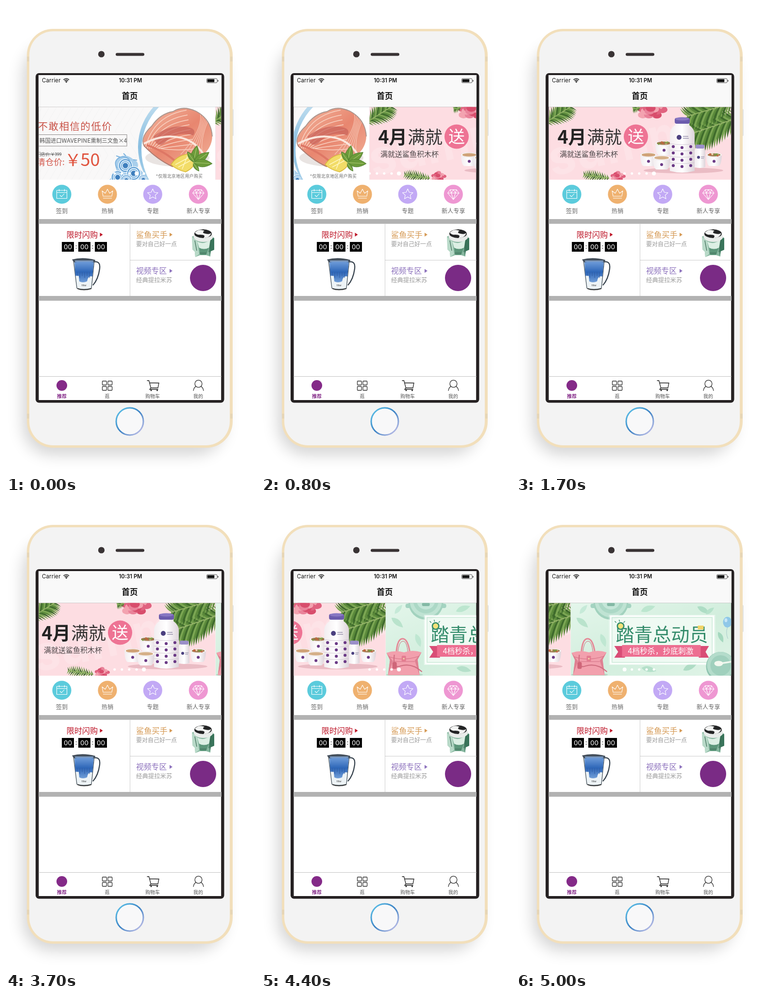
Recreate the animation shown at these times as an HTML page. Size 513 px wide and 962 px high, loop 7.1 s.

```html
<!DOCTYPE html>
<html lang="zh-CN">
<head>
<meta charset="utf-8">
<title>首页</title>
<style>
html, body { margin: 0; width: 100%; height: 100%; overflow: hidden; background: #fff; }
#stage { display: block; width: 513px; height: 962px; font-family: "Noto Sans CJK SC", "Noto Sans CJK", sans-serif; }
.ui { font-family: Inter, Roboto, sans-serif; }
</style>
</head>
<body>
<svg id="stage" viewBox="0 0 513 962"></svg>
<script>
const PAGE = 376;
const WHITE = 'fill="#fff"';

let seed = 7;
const rand = () => (seed = (seed * 16807) % 2147483647) / 2147483647;
const range = (n, fn) => Array.from({ length: n }, (_, i) => fn(i)).join('');

const text = (x, y, size, fill, str, more = '') =>
  `<text x="${x}" y="${y}" font-size="${size}" fill="${fill}" ${more}>${str}</text>`;
const mid = 'text-anchor="middle"';
const rect = (x, y, w, h, fill, r = 0, more = '') =>
  `<rect x="${x}" y="${y}" width="${w}" height="${h}" rx="${r}" fill="${fill}" ${more}/>`;
const disc = (x, y, r, fill, more = '') =>
  `<circle cx="${x}" cy="${y}" r="${r}" fill="${fill}" ${more}/>`;
const oval = (x, y, rx, ry, fill, more = '') =>
  `<ellipse cx="${x}" cy="${y}" rx="${rx}" ry="${ry}" fill="${fill}" ${more}/>`;
const path = (d, fill, more = '') => `<path d="${d}" fill="${fill}" ${more}/>`;
const line = (d, stroke, w = 1, more = '') =>
  `<path d="${d}" fill="none" stroke="${stroke}" stroke-width="${w}" ${more}/>`;
const slide = (i, left, body) =>
  `<svg x="${67.5 + i * PAGE}" y="207.5" width="${PAGE}" height="150" viewBox="${left} 207.5 ${PAGE} 150">${body}</svg>`;

// Palm frond growing along +x before rotation
function palm(x, y, angle, len, width, n) {
  const blades = range(n, i => {
    const s = len * i / n, w = width * (0.45 + 0.55 * Math.sin(Math.PI * (i + 1) / (n + 1)));
    return [1, -1].map(k => path(
      `M${s} 0Q${s + w * 0.3} ${k * w * 0.25} ${s + w * 0.75} ${k * w}Q${s + w * 0.6} ${k * w * 0.25} ${s + 4} 0Z`,
      ['#3f6b2c', '#5b8a3b', '#7ba653'][(i + (k > 0)) % 3])).join('');
  });
  return `<g transform="translate(${x} ${y}) rotate(${angle})">${blades}${line(`M0 0H${len}`, '#9dbb6b', 1.5)}</g>`;
}

const flower = (x, y, r) => range(16, i => {
  const a = i * 2.4, d = r * (1 - i / 18);
  return oval(x + d * Math.cos(a), y + d * 0.7 * Math.sin(a), r * 0.42, r * 0.3,
    ['#e0627f', '#f3a3b0', '#e9839a', '#d84d6c'][i % 4]);
});

const cup = (x, y, rx, h, food) =>
  path(`M${x - rx} ${y}Q${x - rx + 1} ${y + h} ${x - rx * 0.55} ${y + h}H${x + rx * 0.55}Q${x + rx - 1} ${y + h} ${x + rx} ${y}Z`, 'url(#china)') +
  oval(x, y, rx, rx * 0.28, '#fff', 'stroke="#e3dadc" stroke-width=".7"') +
  oval(x, y, rx * 0.84, rx * 0.2, food) + disc(x, y + h * 0.58, 3, '#6b3a86');

function fishSlide() {
  const steak = 'M284 287Q276 269 300 247Q318 221 344 217Q364 204 391 216Q423 233 425 268Q424 291 406 306Q385 300 377 308Q360 322 343 330Q312 316 284 287Z';
  const scale = (x, y, r) => [1, 0.72, 0.45].map((k, i) =>
    disc(x, y, r * k, ['#5b9bd2', '#86b9e3', '#3f7fbd'][i], 'stroke="#e8f4fc" stroke-width="1.6"')).join('');
  const leaf = (x, y, a, l) => `<g transform="translate(${x} ${y}) rotate(${a})">` +
    path(`M0 0Q${l * 0.35} ${-l * 0.42} ${l} 0Q${l * 0.4} ${l * 0.42} 0 0Z`, '#6c9b3a', 'stroke="#47762a" stroke-width=".8"') +
    line(`M0 0H${l * 0.85}`, '#b7d27c', 0.9) + '</g>';
  return rect(55, 207, PAGE, 151, '#f9f8f8') +
    range(16, i => line(`M${60 + i * 15} 207l-30 50l30 50l-30 50`, '#f2f1f1', 0.8)) +
    path('M212 358Q222 346 231 345Q220 324 230 313Q246 301 262 315Q275 320 271 332L300 358Z', '#a9cfec') +
    scale(246, 328, 14) + scale(230, 352, 13) + scale(263, 344, 14) + scale(248, 358, 11) + scale(283, 357, 10) +
    line('M229 334Q220 318 235 311Q250 307 256 320M236 311l-9 -3M247 308l-5 -5M262 316l8 1', '#7fb4de', 2.2) +
    disc(395, 290, 123, 'url(#sea)') + disc(405, 296, 126, '#fff') +
    text(65.5, 255, 20.5, '#c95348', '不敢相信的低价', 'font-weight="500" letter-spacing="1.45"') +
    rect(50, 264.5, 199, 23.5, 'none', 0, 'stroke="#8d8a8a"') +
    text(69, 280.5, 11.4, '#555', '韩国进口<tspan font-size="12.3">WAVEPINE</tspan>熏制三文鱼×4') +
    text(63.5, 308, 8.6, '#555', '门店价:￥399', 'text-decoration="line-through"') +
    text(63.5, 327, 17.5, '#d2564a', '清仓价:') +
    text(121, 328.5, 34, '#e0543f', '￥', 'textLength="0"'.slice(99) + 'font-size="30"') +
    text(153.5, 329, 36, '#e0543f', '50') +
    oval(353, 312, 66, 18, '#e9e4e2') +
    `<clipPath id="cut">${path(steak, '#000')}</clipPath>` +
    path(steak, 'url(#salmon)') +
    `<g clip-path="url(#cut)">` +
    range(9, i => line(`M${287 + i * 4} 293Q${302 + i * 6} ${226 + i * 9} ${372 + i * 2} ${214 + i * 10}`, '#f9d3c3', 1.5)) +
    range(6, i => line(`M${398 + i * 6} 210Q${412 - i * 3} ${250 + i * 4} ${360 + i * 9} 305`, '#f6c3b1', 1.3)) +
    path('M304 268Q337 242 375 249Q394 253 386 266Q352 255 326 282Q310 293 304 268Z', '#c9635a', 'opacity=".7"') +
    line('M284 283Q322 263 356 270Q388 275 407 305', '#fbe6dc', 4) +
    line('M290 286Q326 298 351 321', '#de7765', 4) + '</g>' +
    line('M284 287Q276 269 300 247Q318 221 344 217Q364 204 391 216Q423 233 425 268', '#a9968f', 1.8) +
    line('M284 287Q312 316 343 330Q360 322 377 308', '#b17c70', 2) +
    path('M340 326Q356 301 391 304Q395 329 370 341Q352 337 340 326Z', '#f2dc68', 'stroke="#d8b93b" stroke-width="1.5"') +
    line('M349 326L381 309M363 335L374 308M389 313L355 331', '#fff6bf', 1.5) +
    leaf(386, 322, -78, 36) + leaf(388, 322, -35, 37) + leaf(387, 322, 3, 38) + leaf(386, 323, 55, 20) + leaf(388, 320, -125, 25) +
    text(309, 352.5, 8.7, '#666', '*仅限北京地区用户购买', 'letter-spacing=".5"');
}

function giftSlide() {
  const rows = [289, 302, 315, 328];
  return rect(67, 207, 377, 151, '#fddde2') +
    text(74, 350, 100, '#fff', 'summer', 'class="ui" font-weight="700" opacity=".2" transform="rotate(-12 74 350)"') +
    palm(60, 240, -32, 62, 25, 15) +
    flower(278, 213, 24) + palm(256, 209, 170, 14, 10, 5) +
    palm(462, 228, 161, 108, 44, 22) + palm(452, 198, 164, 104, 36, 20) +
    palm(192, 354, 188, 53, 13, 12) + flower(209, 350, 12) +
    text(85.5, 282.5, 37.5, '#232323', '4月', 'font-weight="700"') +
    text(146, 282.5, 36, '#333', '满就', 'font-weight="300"') +
    disc(247, 268.5, 25, '#ee7394') + text(247, 281, 34, '#fff', '送', mid) +
    text(90, 309.5, 15, '#4a4648', '满就送鲨鱼积木杯') +
    oval(345, 338, 82, 6, '#eabcc4') +
    cup(305, 282, 18, 25, '#9d764e') + range(10, i => disc(294 + rand() * 22, 279 + rand() * 5, 2, ['#799b45', '#c56341', '#ecd5ae'][i % 3])) +
    path('M328 238V245Q317 253 317 264V339Q342 346 368 339V264Q368 253 357 245V238Z', 'url(#china)') +
    rect(327, 230, 31, 12, '#6c5cad', 4) + oval(342.5, 232, 14, 3.5, '#8877c3') +
    rows.map((y, j) => line(`M317 ${y - 6}Q342 ${y - 2} 368 ${y - 6}`, '#c9bfce', 0.8) +
      [324, 342, 360].map(x => disc(x, y + (x === 342 ? 2 : 0), 3.1, '#6b3a86')).join('')).join('') +
    disc(336, 270, 5, '#4b407f') + line('M344 268h11M344 272h12', '#71688f', 1.2) +
    path('M371 291Q368 294 368 300V331Q379 335 390 331V300Q390 294 387 291Z', 'url(#china)') +
    rect(370, 285, 18, 8, '#9a8fc9', 3) + disc(376, 311, 3, '#4b407f') + line('M381 310h7M381 313h6', '#71688f', 0.8) +
    cup(273, 306, 17, 23, '#cfa277') + cup(300, 312, 18, 24, '#d5b089') +
    cup(408, 306, 16, 23, '#a17a51') + range(8, i => disc(397 + rand() * 20, 303 + rand() * 5, 2, ['#799b45', '#c56341', '#ecd5ae'][i % 3]));
}

function springSlide() {
  const leaf = (x, y, a, s, c) => path('M0 0Q10 -10 24 0Q10 8 0 0Z', c, `transform="translate(${x} ${y}) rotate(${a}) scale(${s})"`);
  return rect(112, 207, PAGE, 151, 'url(#mint)') +
    leaf(124, 238, 40, 1.3, '#b9e3cc') + leaf(131, 230, -50, 1, '#c6ead8') + leaf(257, 225, -20, 1.3, '#bce6cf') +
    leaf(373, 215, 30, 1.2, '#aeddc5') + leaf(391, 231, -40, 0.9, '#b6e2cb') + leaf(416, 267, 65, 1, '#a5d8bf') +
    leaf(174, 271, 70, 1.2, '#bfe7d2') + leaf(258, 341, 12, 1.3, '#b5e0ca') + leaf(344, 346, -25, 1.3, '#afdcc5') +
    rect(153, 209, 84, 9, '#a4d3c1', 4) + disc(195, 206, 36, '#a2d2be') + disc(195, 204, 33, '#bfe3d3') +
    disc(195, 203, 26, '#acd8c6') + disc(195, 202, 19, '#c4e6d8') + rect(187, 207, 16, 7, '#83b9a5', 3) +
    rect(191, 232, 219, 103, '#fff', 0, 'opacity=".45"') +
    rect(194.5, 234.5, 212, 98, '#f2fbf4', 0, 'stroke="#fff" stroke-width="2" fill-opacity=".75"') +
    rect(197.5, 237.5, 206, 92, 'none', 0, 'stroke="#b7dfcb" stroke-width=".8"') +
    oval(435, 247, 9, 11, '#8fc8e8') + oval(432, 243, 3, 4, '#c7e6f6') + line('M435 258q-4 11 1 23', '#9bbfc4', 0.8) +
    disc(421, 338, 30, '#8fc4b0') + disc(421, 336, 28, '#b4dccb') + disc(421, 336, 21, '#a0d0bd') +
    line('M420 332L445 328', '#f0f7ee', 3.5) + oval(417, 332, 9, 5.5, '#f3f8ef') +
    text(205, 285.5, 38, '#348c6b', '踏青总动员', 'font-weight="500"') +
    rect(374, 254, 12, 8, '#f2d568') + disc(215, 255, 8, '#348c6b') + disc(215, 255, 5.4, '#f5e27a') +
    line('M206 248l-3 -3M213 246l-1 -4M221 248l3 -3', '#348c6b', 1.3) +
    path('M202 296H224V320H202L210 308Z', '#d94d76') + path('M397 296H376V320H397L390 308Z', '#d94d76') +
    rect(218, 294, 162, 24, '#ed6e91') +
    text(230, 312, 15.8, '#fff', '4档秒杀，抄底刺激') +
    oval(151, 355, 38, 4, '#b9d8c5') +
    line('M134 311Q136 281 147 281Q158 281 162 310', '#e58a98', 3.2) + line('M137 311Q139 286 148 286Q156 286 158 310', '#c96c7c', 1) +
    path('M114 310Q131 304 150 309Q168 303 186 309L178 324L182 356H117L121 325Z', '#f2a0ad') +
    path('M114 310L121 325L117 356L127 327Z', '#de8192') + path('M186 309L178 324L182 356L172 326Z', '#de8192') +
    line('M119 318Q148 328 181 317M127 328H172', '#d47385', 1.2) + rect(145, 316, 9, 12, '#e37d90', 2) + disc(149.5, 322, 1.6, '#f6e0a8') +
    line('M130 314Q126 344 143 337Q166 330 187 349', '#d06f81', 2.2) + rect(126, 329, 9, 14, '#cf6679', 3);
}

const pageDots = range(5, i => `<circle class="dot" cx="${223.7 + i * 15.1}" cy="344.3" fill="#fff"/>`);

function statusBar() {
  return rect(67, 142, 377, 65, '#f9f9f9') + rect(67, 207, 377, 0.8, '#b5b5b5') +
    text(74, 157.3, 11.4, '#111', 'Carrier', 'class="ui" letter-spacing=".2"') +
    line('M118.5 151.6Q124.3 146.8 130 151.6M120.6 153.9Q124.3 150.8 128 153.9', '#111', 1.5) + path('M122 155.4Q124.3 153.6 126.600 155.4L124.3 157.8Z', '#111') +
    text(256.5, 157.3, 11.2, '#111', '10:31 PM', `class="ui" font-weight="600" ${mid}`) +
    rect(413.5, 149.2, 21.5, 8.6, 'none', 2, 'stroke="#333" stroke-width=".8"') + rect(414.8, 150.4, 14.500, 6.200, '#111', 0.8) + rect(436, 152, 1.4, 3.4, '#333', 0.7) +
    text(255, 191, 16.5, '#111', '首页', `font-weight="700" ${mid}`);
}

function shortcuts() {
  const items = [
    [115, '#5bcbdc', '签到', 'M104.500 379H125.500V395.500H104.500ZM104.500 383.500H125.500M109.500 376.500V381M120.500 376.500V381M111 389L114.500 392L120 386'],
    [209, '#efb16f', '热销', 'M200 391L198 380L204.500 385L209 376.500L213.500 385L220 380L218 391ZM200 395H218'],
    [302.300, '#c2a9f5', '专题', 'M302.300 376L305.500 383L313 383.800L307.400 388.900L309 396.300L302.300 392.500L295.600 396.300L297.200 388.900L291.600 383.800L299.100 383Z'],
    [396.300, '#ee97d2', '新人专享', 'M390 377.500H402.600L408 384.500L396.300 398L384.600 384.500ZM384.600 384.500H408M390 377.500L392 384.500L396.300 398L400.600 384.500L402.600 377.500M392 384.500L396.300 377.500L400.600 384.500']
  ];
  return items.map(([x, c, label, d]) => disc(x, 387, 19.6, c) +
    line(d, '#fff', 1.1, 'stroke-linejoin="round"') + text(x, 425.5, 12.2, '#666', label, mid)).join('');
}

function pitcher() {
  return line('M180 526Q195 523 193 540Q190 562 179 574', '#35414c', 2.2) +
    path('M139 523H182L176 580Q160 585 146 580Z', '#edf3f6', 'stroke="#45525b" stroke-width="1.3"') +
    path('M141 526H181L178 556Q169 553 167 566Q158 570 151 566L150 555Q144 553 143 556Z', 'url(#water)') +
    path('M136 521Q159 515 184 522L183 527Q160 523 140 527Z', '#45505c') + rect(142, 523, 38, 3, '#7897bf', 1) +
    range(6, i => line(`M${147 + i * 5} 547V${555 + i % 2 * 4}`, '#325c9f', 1)) +
    text(161, 576, 4.800, '#333', 'filter', `class="ui" ${mid}`) + line('M147 581Q160 586 176 581', '#333', 1.6);
}

function creamJar() {
  return path('M389 482L383 474L393 470H421L429 477V501L422 504L421 515L412 512H400L390 516L389 505L384 500Z', '#87b7a0') +
    path('M383 474L394 484L398 510L390 516L389 505L384 500Z', '#b8d9c8') + path('M421 478L429 477V501L422 504L419 514Z', '#39745a') +
    path('M394 484Q407 492 421 480L418 497Q407 503 398 497Z', '#dcefe4') + path('M398 497Q408 502 418 497L412 512H400Z', '#5c967a') +
    line('M389 482L393 503M422 482L418 506M399 508H413', '#34634e', 1.2) +
    oval(406.500, 474, 20, 11, '#e9ecea') + oval(406, 468, 18, 9, '#232425') + path('M389 466Q397 457 409 462Q402 466 411 468Q420 470 423 466Q420 477 407 477Q413 470 400 470Q393 471 389 466Z', '#f2f3f2');
}

function content() {
  const arrow = (x, y, c) => path(`M${x} ${y - 4}L${x + 6} ${y}L${x} ${y + 4}Z`, c);
  return rect(67, 438, 377, 9.700, '#b2b2b2') + rect(67, 596, 377, 9.800, '#b2b2b2') +
    rect(255, 447.700, 0.9, 148.300, '#c8c8c8') + rect(255, 522, 189, 0.9, '#c8c8c8') +
    text(124.500, 475.500, 16.200, '#bd1527', '限时闪购') + arrow(193.500, 470, '#bd1527') +
    [115, 149, 183].map(x => rect(x, 485, 25, 20, '#000') + text(x + 12.500, 500, 13.500, '#fff', '00', `class="ui" ${mid}`)).join('') +
    [144.500, 178.500].map(x => text(x, 499, 13, '#222', ':', mid)).join('') +
    pitcher() +
    text(268, 475.500, 16.200, '#d69b57', '鲨鱼买手') + arrow(337, 470, '#d69b57') +
    text(268, 493.500, 12, '#999', '要对自己好一点') + creamJar() +
    text(268, 550, 15.800, '#8d72bd', '视频专区') + arrow(337, 544.500, '#8d72bd') +
    text(268, 567.500, 12.400, '#999', '经典提拉米苏') + disc(406, 559, 27, '#7a2b85');
}

function tabBar() {
  const tabs = [[115, '推荐', '#842a88'], [208.500, '逛', '#555'], [302, '购物车', '#555'], [396, '我的', '#555']];
  return rect(67, 761, 377, 0.9, '#bdbdbd') + disc(115, 780, 11, '#842a88') +
    [198.500, 210].map(x => [771, 782].map(y => rect(x, y, 8.600, 8, 'none', 1, 'stroke="#333" stroke-width="1.3"')).join('')).join('') +
    line('M290.500 770H294.500L298.500 785H313L315 775L296 774.500M298.500 785L296 788H313.500', '#222', 1.3) +
    [299, 311.500].map(x => disc(x, 790, 1.5, '#222')).join('') +
    line('M386 791Q387 781 396.500 781Q406 781 407 791', '#333', 1.3) + disc(396.500, 776.500, 7.400, '#fff', 'stroke="#333" stroke-width="1.3"') +
    tabs.map(([x, label, c]) => text(x, 806.300, 10, c, label, `${mid} ${c === '#555' ? '' : 'font-weight="700"'}`)).join('');
}

function phone() {
  const side = (x, y, h) => rect(x, y, 4, h, '#e3e3e2', 1.5);
  return rect(35, 80, 415, 842, '#000', 60, 'opacity=".17" filter="url(#soft)"') +
    side(40.500, 160, 23) + side(40.500, 212, 55) + side(40.500, 282, 55) + side(465, 212, 55) +
    rect(43, 47, 424, 861, '#f2dfbb', 54) +
    [[43, 104], [462, 104], [43, 838], [462, 838]].map(([x, y]) => rect(x, y, 5, 10, '#e7d6b6')).join('') +
    rect(48, 52, 413, 851, '#f3f3f3', 49) +
    disc(196.500, 99, 6.600, '#393334') + rect(226, 96.500, 59, 6, '#393334', 3) +
    disc(255, 854, 28, '#f8f8f9', 'stroke="url(#ring)" stroke-width="3"') +
    rect(61, 138, 388.500, 677.500, '#252122', 7) + rect(67.500, 142, 375.700, 668, '#fff');
}

const ramp = (id, dir, ...colors) => `<linearGradient id="${id}" ${dir}>` +
  colors.map((c, i) => `<stop offset="${i / (colors.length - 1)}" stop-color="${c}"/>`).join('') + '</linearGradient>';
const down = 'x1="0" y1="0" x2="0" y2="1"', slant = 'x1="0" y1="0" x2="1" y2="1"';

const stage = document.getElementById('stage');
stage.innerHTML = `<defs>
  ${ramp('sea', down, '#d5eaf5', '#87bde0', '#c3e0f1')}
  ${ramp('salmon', slant, '#f3b8a0', '#e8866f', '#f1b199')}
  ${ramp('china', '', '#f2edf0', '#fff', '#ddd3da')}
  ${ramp('mint', slant, '#e4f6eb', '#d2eedd', '#e2f5e9')}
  ${ramp('water', down, '#6d9bd8', '#2d66b8', '#719ed8')}
  ${ramp('ring', slant, '#60c9ed', '#3b82c4', '#d8c9ee')}
  <filter id="soft" x="-20%" y="-20%" width="140%" height="140%"><feGaussianBlur stdDeviation="16"/></filter>
  <clipPath id="banner"><rect x="67.5" y="207.5" width="375.700" height="149.500"/></clipPath>
  </defs>` +
  phone() + statusBar() +
  `<g clip-path="url(#banner)"><g id="strip">${slide(0, 55.5, fishSlide())}${slide(1, 67.5, giftSlide())}${slide(2, 112, springSlide())}</g>${pageDots}</g>` +
  shortcuts() + content() + tabBar();

const strip = document.getElementById('strip');
const dots = [...stage.querySelectorAll('.dot')];

// Swipe curve: step, distance, speed
const SWIPE = [[1, 12, 13], [5, 94, 27], [9, 220, 33], [10, 252, 29], [14, 331, 14], [18, 376, 4]];

function travel(step) {
  if (step >= 18) return PAGE;
  const i = SWIPE.findIndex(k => k[0] > step);
  const [a, p, u] = SWIPE[i - 1], [b, q, v] = SWIPE[i];
  const w = b - a, s = (step - a) / w, r = 1 - s;
  return p * r * r * (1 + 2 * s) + q * s * s * (3 - 2 * s) + w * s * r * (u * r - v * s);
}

function render(ms) {
  const tick = Math.floor((ms % 7100) / 100);
  const scroll = tick < 37 ? travel(tick + 1) : PAGE + travel(Math.min(tick - 36, 14));
  const active = (3 + Math.round(scroll / PAGE)) % 5;
  strip.setAttribute('transform', `translate(${-scroll.toFixed(2)} 0)`);
  dots.forEach((d, i) => d.setAttribute('r', i === active ? 4 : 2.5));
}

let start;
function loop(now) {
  start ??= now;
  render(now - start);
  requestAnimationFrame(loop);
}
render(0);
requestAnimationFrame(loop);
</script>
</body>
</html>
```
